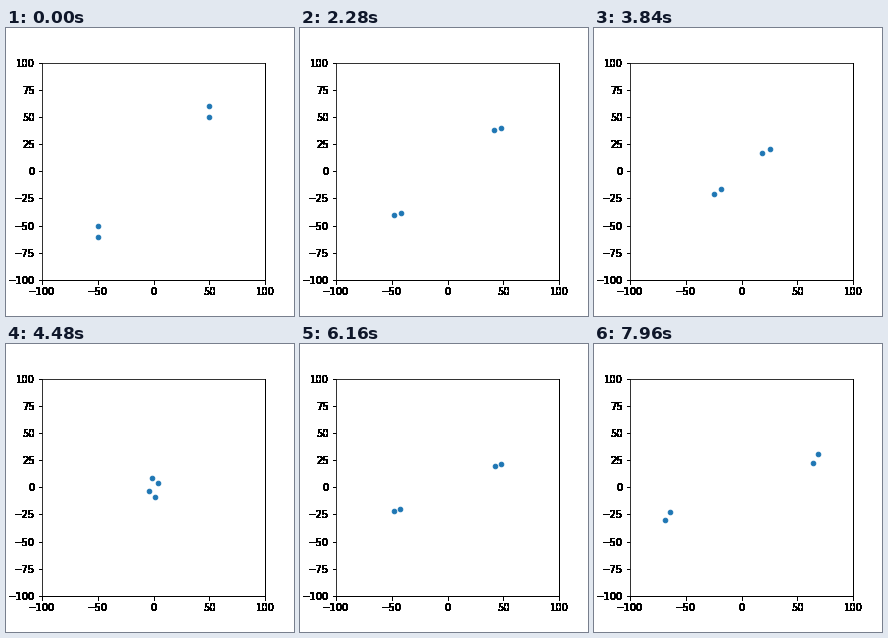
A matplotlib script that plays this animation: 288x288 px, repeating every 8 s.

```python
import numpy as np
import matplotlib.pyplot as plt
from matplotlib.animation import FuncAnimation

FRAMES = 200
INTERVAL = 40
LIMIT = 100
MEET = 113        # frame at which the two pairs swing past each other
OVERDRAW = 100    # labels pile up outside the plot area and lose their soft edges


def falling(t):
    """Pair dropping towards the centre: heavy body, then turn and radius of the light one."""
    fall = 50 * (1 - (t / 116) ** 2.25)
    drift = 1.6 * np.sin(np.pi * t / MEET)
    turn = 7.6 * t + 184 * (t / 112) ** 8.4
    radius = 7.9 - 0.005 * t + 2.1 * np.cos(2 * np.pi * t / 34.2)
    return fall + drift, fall - drift, np.radians(turn), radius


def leaving(t):
    """Pair flung outwards, the light body on a widening ellipse."""
    u = t - MEET
    reach = 9.17 * u ** 0.471
    course = np.radians(24.9 - 0.012 * u)
    ecc = 0.3
    mean = 2 * np.pi * (u - 37) / 48
    turn = np.radians(195) + mean + 2 * ecc * np.sin(mean) + 1.25 * ecc ** 2 * np.sin(2 * mean)
    radius = (3.9 + 0.1 * u) * (1 - ecc * np.cos(mean))
    return reach * np.cos(course), reach * np.sin(course), turn, radius


def bodies(t):
    """Both bodies of a pair and their mirror images through the centre."""
    x, y, turn, radius = falling(t) if t <= MEET else leaving(t)
    xs = np.array([x, x + radius * np.sin(turn)])
    ys = np.array([y, y + radius * np.cos(turn)])
    return np.concatenate([xs, -xs]), np.concatenate([ys, -ys])


def overdrawn_page(fig, ax):
    """The empty chart, with everything outside the plot area drawn many times over."""
    fig.canvas.draw()
    once = np.asarray(fig.canvas.buffer_rgba())[..., :3] / 255
    page = once ** OVERDRAW
    height = len(page)
    x0, y0, x1, y1 = np.rint(ax.bbox.extents).astype(int)
    inside = np.s_[height - y1:height - y0, x0:x1]
    page[inside] = once[inside]
    return page


plt.rcParams["font.family"] = "DejaVu Sans"
plt.rcParams["font.size"] = 10
fig = plt.figure(figsize=(4, 4), dpi=72, facecolor="white")
ax = fig.add_axes([0.125, 0.125, 0.775, 0.755])
ax.set(xlim=(-LIMIT, LIMIT), ylim=(-LIMIT, LIMIT),
       xticks=range(-LIMIT, LIMIT + 1, 50), yticks=range(-LIMIT, LIMIT + 1, 25))

fig.figimage(overdrawn_page(fig, ax), origin="upper", zorder=-1)
ax.set_axis_off()
dots, = ax.plot(*bodies(0), "o", color="#1f77b4", markersize=4.6)


def update(frame):
    dots.set_data(*bodies(frame))
    return dots,


anim = FuncAnimation(fig, update, frames=FRAMES, interval=INTERVAL,
                     repeat=True, repeat_delay=0)
plt.show()
```
